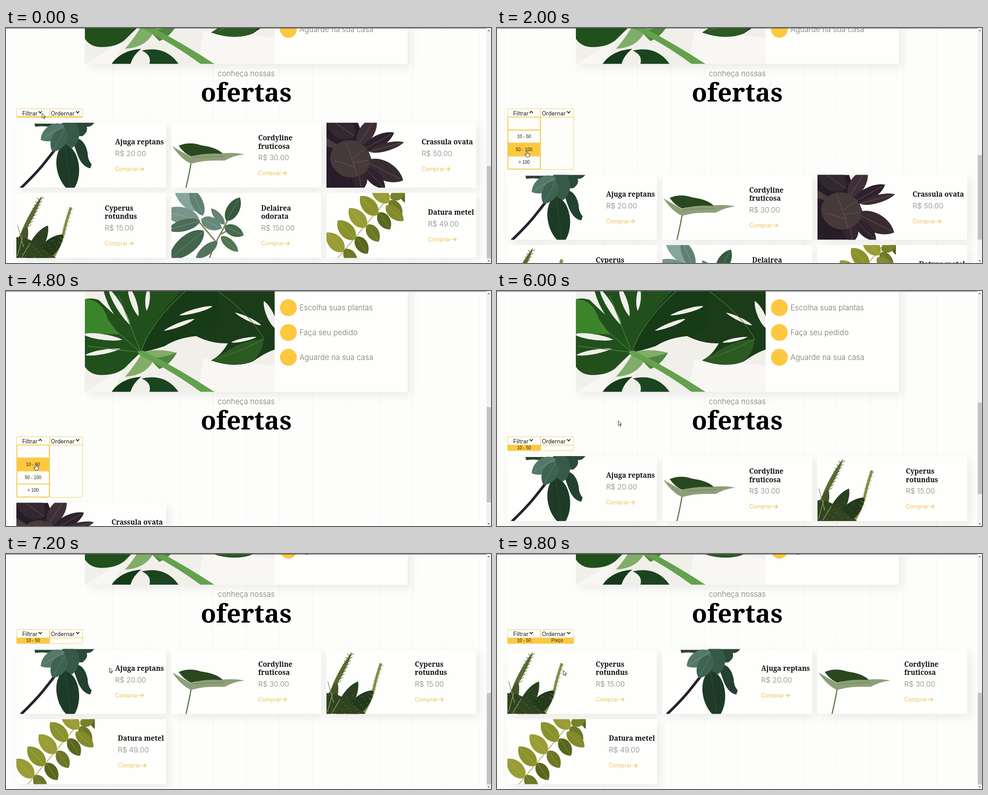
Recreate the animation shown at these times as an HTML page with a canvas. Size 1076x521 px, loop 10000 ms.

```html
<!DOCTYPE html>
<html lang="pt">
<head>
<meta charset="utf-8">
<style>
html, body { margin: 0; width: 100%; height: 100%; overflow: hidden; background: #fdfdfb; }
canvas { display: block; }
</style>
</head>
<body>
<canvas id="stage" width="1076" height="521"></canvas>
<script>
const ctx = document.getElementById('stage').getContext('2d');
const YELLOW = '#fdc840', LINE = '#f2cf5c', PAPER = '#f1efea';
const SANS = 'Inter, sans-serif', SERIF = '"Noto Serif", serif', ARIAL = '"Liberation Sans", sans-serif';

function box(x, y, w, h, color) {
  ctx.fillStyle = color;
  ctx.fillRect(x, y, w, h);
}
function frame(x, y, w, h, width = 1) {
  ctx.strokeStyle = LINE;
  ctx.lineWidth = width;
  ctx.beginPath();
  ctx.roundRect(x, y, w, h, 2);
  ctx.stroke();
}
function text(str, x, y, font, color, align = 'left') {
  ctx.font = font;
  ctx.fillStyle = color;
  ctx.textAlign = align;
  ctx.fillText(str, x, y);
}
function shape(d, fill) {
  ctx.fillStyle = fill;
  ctx.fill(new Path2D(d));
}
function line(d, color, width) {
  ctx.strokeStyle = color;
  ctx.lineWidth = width;
  ctx.stroke(new Path2D(d));
}
function shadowBox(x, y, w, h) {
  ctx.save();
  ctx.shadowColor = 'rgba(0,0,0,.07)';
  ctx.shadowBlur = 20;
  ctx.shadowOffsetX = ctx.shadowOffsetY = 8;
  box(x, y, w, h, '#fefefd');
  ctx.restore();
}
// Pointed leaf from (x1,y1) to (x2,y2), with an optional midrib.
function leaf(x1, y1, x2, y2, width, color, rib) {
  const len = Math.hypot(x2 - x1, y2 - y1);
  ctx.save();
  ctx.translate(x1, y1);
  ctx.rotate(Math.atan2(y2 - y1, x2 - x1));
  const w = width * 0.66;
  shape(`M0 0C${len * .15} ${-w} ${len * .75} ${-w} ${len} 0C${len * .75} ${w} ${len * .15} ${w} 0 0`, color);
  if (rib) line(`M0 0H${len * .92}`, rib, 0.8);
  ctx.restore();
}

function drawAjuga() {
  line('M10 145Q44 112 60 92T90 54', '#25222c', 6);
  leaf(107, 46, 122, 154, 50, '#1e3b27', '#34533b');
  shape('M122 34Q150 30 158 66Q158 82 167 92L164 101Q146 98 136 72Z', '#24402f');
  shape('M40 2H100V18Q72 4 42 9Z', '#29442f');
  shape('M104 0H173Q166 10 156 9Q160 20 146 30Q126 30 104 14Z', '#2c4a38');
  leaf(112, -8, 124, 56, 44, '#365a47');
  leaf(106, 6, 54, 38, 34, '#55786b', '#7d9a8c');
  leaf(108, 14, 80, 64, 34, '#3e6350', '#66887a');
}
function drawCordyline() {
  line('M44 86Q40 112 32 145', '#55703f', 2.4);
  shape('M2 52Q22 64 44 76Q90 60 112 68Q140 65 162 70Q140 72 118 84Q70 82 44 91Q22 82 2 52', '#8d9f78');
  shape('M16 51Q40 41 66 50Q102 55 114 69Q74 66 44 75Q28 68 16 51', '#294820');
  line('M44 77Q80 76 118 74', '#5d7747', 0.8);
}
function drawCrassula() {
  const rib = '#77655f';
  shape('M0 0H70L92 60L104 92L84 120V144H0Z', '#261d28');
  shape('M0 34L26 50L14 56L0 52Z', '#4a3c40');
  leaf(62, 30, 0, -14, 50, '#33282f', rib);
  leaf(70, 50, 110, -12, 34, '#3e3036', rib);
  leaf(78, 62, 150, 22, 28, '#2d222c', rib);
  leaf(95, 64, 172, 43, 18, '#3a2c31', rib);
  leaf(88, 86, 170, 128, 42, '#382b31', rib);
  leaf(84, 100, 130, 146, 28, '#2d222d', rib);
  leaf(70, 100, 78, 150, 34, '#33262f', rib);
  ctx.beginPath();
  ctx.ellipse(53, 80, 45, 41, 0.3, 0, 7);
  ctx.fillStyle = '#463a3a';
  ctx.fill();
  line('M68 120Q58 76 42 44M62 98L18 84M58 78L84 60M60 88L92 84', rib, 0.8);
}
function drawCyperus() {
  leaf(8, 98, 57, 6, 10, '#596c32');
  line('M80 146Q100 112 105 88T121 32', '#838b47', 6);
  leaf(0, 150, 24, 72, 22, '#46552a');
  leaf(24, 152, 70, 72, 30, '#2b4020');
  leaf(44, 152, 104, 92, 34, '#24381b');
  shape('M0 98Q26 96 50 118L88 144H0Z', '#2f441f');
  for (let i = 0; i < 34; i++) {
    const x = i * 37 % 88 + 3, y = 102 + i * 23 % 42;
    box(x, y, 1.2, 1.2, '#93a05d');
  }
  for (let i = 0; i < 9; i++) {
    const x = 24 + i * 3.5, y = 76 - i * 7.5;
    line(`M${x - 6} ${y - 5}L${x} ${y}L${x + 9} ${y - 6}`, '#59682f', 1.3);
    line(`M${98 + i * 2.7} ${112 - i * 9}l-5 -5m5 5l7 -5`, '#9aa264', 1);
  }
  line('M2 140L14 98M12 142L30 112M3 72L16 120', '#8e9565', 1.5);
}
function drawDelairea() {
  line('M84 146Q94 116 108 92T132 44M100 110L58 60M108 92L140 76', '#807d5c', 3);
  leaf(58, 40, 6, -20, 34, '#86a59b');
  leaf(70, 50, 42, -12, 26, '#5f8174', '#91a89b');
  leaf(62, 60, -18, 40, 38, '#779589', '#9fb6aa');
  leaf(64, 62, -10, 82, 26, '#4c6e59', '#8ca291');
  leaf(66, 58, 112, 78, 28, '#66897a', '#9cb2a2');
  leaf(72, 84, -6, 148, 40, '#42654c', '#819a80');
  leaf(102, 108, 54, 146, 22, '#54745d');
  leaf(122, 62, 152, 10, 28, '#365a3d', '#738d6b');
  leaf(118, 74, 160, 94, 25, '#456b4f', '#8ca083');
  leaf(110, 96, 148, 130, 20, '#527654', '#8ca083');
  leaf(118, 70, 88, 34, 16, '#658371');
}
function drawDatura() {
  line('M24 146Q74 86 148 -2', '#b5b377', 2);
  for (let i = 0; i < 6; i++) {
    const x = 38 + i * 25, y = 130 - i * 27;
    leaf(x, y, x - 38, y - 42, 32, i % 2 ? '#8b922c' : '#9a9c35', '#b6b562');
    leaf(x + 3, y - 6, x + 28, y + 32, 27, i % 2 ? '#59661f' : '#6d7826', '#95994a');
  }
  leaf(132, 28, 171, 62, 26, '#838a2c', '#adad5b');
  leaf(142, 12, 174, -4, 24, '#77812b');
}

const plants = [
  { title: ['Ajuga reptans'], price: 20, left: 219, draw: drawAjuga },
  { title: ['Cordyline', 'fruticosa'], price: 30, left: 192.5, draw: drawCordyline },
  { title: ['Crassula ovata'], price: 50, left: 211, draw: drawCrassula },
  { title: ['Cyperus', 'rotundus'], price: 15, left: 196, draw: drawCyperus },
  { title: ['Delairea', 'odorata'], price: 150, left: 199, draw: drawDelairea },
  { title: ['Datura metel'], price: 49, left: 225, draw: drawDatura },
];

function drawCard(plant, x, y) {
  shadowBox(x, y, 332, 144);
  ctx.save();
  ctx.translate(x, y);
  ctx.save();
  ctx.beginPath();
  ctx.rect(0, 0, 174, 144);
  ctx.clip();
  plant.draw();
  ctx.restore();
  const { title, left } = plant, two = title.length > 1;
  title.forEach((row, i) => text(row, left, (two ? 39 : 48) + i * 18.5, `900 15.3px ${SERIF}`, '#111'));
  const base = two ? 83 : 74;
  text(`R$ ${plant.price}.00`, left, base, `300 16.2px ${SANS}`, '#85857f');
  text('Comprar', left, base + 33, `400 12.4px ${SANS}`, '#efc453');
  line(`M${left + 53} ${base + 29}h10m-4.5 -4.5l4.5 4.5l-4.5 4.5`, '#efc453', 1.4);
  ctx.restore();
}

// Local y = 0 lies 223.5 px above the lower edge of the hero.
function drawHero(bottom) {
  shadowBox(175, bottom - 330, 716, 330);
  ctx.save();
  ctx.translate(0, bottom - 223.5);
  ctx.beginPath();
  ctx.rect(175, -110, 421, 333.5);
  ctx.clip();
  box(175, -110, 421, 334, PAPER);
  shape('M175 224L265 168L235 224ZM438 150L596 165V224H425Z', '#f8f7f4');
  // right-hand leaves
  shape('M380 -10H596V130Q576 136 548 156Q510 172 455 154Q478 142 492 116Q440 118 390 80Z', '#1a3c18');
  shape('M572 106Q540 108 510 122Q484 136 455 154Q505 172 545 156Q568 142 572 106Z', '#2c5922');
  leaf(600, 84, 572, 22, 16, PAPER);
  leaf(566, 76, 508, 48, 8, PAPER);
  leaf(500, 114, 556, 102, 7, PAPER);
  line('M572 106Q540 50 470 0M572 106Q530 130 470 150', '#4c7a3c', 1.2);
  // large leaf
  shape('M175 -10H470V66Q458 98 420 100Q380 104 352 122Q322 132 299 136Q282 152 262 172Q240 188 206 186Q186 184 175 168Z', '#21501c');
  shape('M175 18Q212 18 226 62L250 96L175 94Z', '#3c842a');
  shape('M299 136Q318 70 400 -10H470V66Q458 98 420 100Q380 104 352 122Q322 132 299 136Z', '#173a17');
  shape('M175 -10H214Q222 26 240 52Q226 40 206 20Q190 14 175 18Z', PAPER);
  leaf(228, -4, 276, 76, 13, PAPER);
  leaf(272, -8, 294, 56, 13, PAPER);
  leaf(316, -6, 312, 44, 10, PAPER);
  leaf(172, 96, 258, 108, 13, PAPER);
  leaf(176, 142, 254, 128, 10, PAPER);
  leaf(418, 62, 350, 88, 9, PAPER);
  leaf(458, 34, 384, 54, 9, PAPER);
  line('M299 136Q320 70 398 0M299 136L190 42M299 136L180 122M299 136L250 10', '#4f8540', 1.3);
  shape('M299 142Q282 170 264 190Q308 188 326 156Q358 158 379 137Q340 126 299 136Z', '#80ad68');
  shape('M318 150Q348 148 379 137Q364 164 340 173Z', '#4f8740');
  shape('M293 134L304 132Q390 176 463 224H432Q370 178 294 141Z', '#64a14f');
  // lower leaves
  shape('M234 224Q254 194 300 190Q282 204 276 224Z', '#163b1b');
  shape('M301 194Q354 182 383 224H318Q324 204 301 194Z', '#1b4520');
  ctx.restore();
  ['Escolha suas plantas', 'Faça seu pedido', 'Aguarde na sua casa'].forEach((step, i) => {
    const y = bottom - 186.5 + i * 55;
    ctx.fillStyle = YELLOW;
    ctx.beginPath();
    ctx.arc(626.5, y, 18.7, 0, 7);
    ctx.fill();
    text(step, 651, y + 6, `300 16.8px ${SANS}`, '#777771');
  });
}

const menus = [
  { label: 'Filtrar', x: 23.5, textX: 36, chevron: 76, options: ['', '10 - 50', '50 - 100', '> 100'] },
  { label: 'Ordernar', x: 97, textX: 99.5, chevron: 159, options: ['', 'Nome', 'Preço'] },
];

function drawMenu(menu, top, bottom, open, chosen, anyChosen, cursor) {
  const { x, options } = menu, list = top + 18.5;
  frame(x, top, 73, bottom - top);
  text(menu.label, menu.textX, top + 14.5, `400 12.4px ${SANS}`, '#1c1c1c');
  const flip = open ? -1 : 1;
  line(`M${menu.chevron - 3.5} ${top + 7.5 - flip * 2}l3.5 ${flip * 4}l3.5 ${-flip * 4}`, '#111', 1.7);
  if (open) {
    options.forEach((option, i) => {
      const y = list + i * 28.8;
      const hover = cursor.x > x && cursor.x < x + 73 && cursor.y >= y && cursor.y < y + 28.8;
      if (hover) box(x, y, 73, 28.8, YELLOW);
      frame(x + 0.5, y, 72, 28.8, 2);
      text(option, x + 36.5, y + 17.5, `10px ${ARIAL}`, '#222', 'center');
    });
  } else if (chosen) {
    box(x, list - 0.5, 73, 13, YELLOW);
    text(options[chosen], x + 36.5, list + 9, `10px ${ARIAL}`, '#222', 'center');
  } else {
    box(x, list - 0.5, 73, 1.2, LINE);
    if (!anyChosen && bottom - list < 20) box(x, bottom - 2.5, 73, 3, LINE);
  }
}

const cursorPath = [
  [0, 80, 189], [600, 77, 190], [1000, 68, 212], [1400, 66, 240], [1900, 66, 273], [2400, 66, 273],
  [3000, 189, 320], [3400, 189, 320], [3900, 76, 332], [4100, 76, 332], [4700, 66, 384], [5200, 66, 384],
  [5800, 269, 288], [6900, 269, 287], [7700, 144, 178], [8200, 144, 178], [8900, 135, 255],
  [9400, 135, 257], [9700, 147, 258], [10000, 147, 258],
];
function cursorAt(t) {
  const i = cursorPath.findIndex(key => key[0] > t);
  const [t0, x0, y0] = cursorPath[i - 1], [t1, x1, y1] = cursorPath[i];
  const u = (t - t0) / (t1 - t0), k = u * u * (3 - 2 * u);
  return { x: x0 + (x1 - x0) * k, y: y0 + (y1 - y0) * k };
}
function drawCursor({ x, y }, kind) {
  const outlines = {
    arrow: 'M0 0V10.5L2.6 8.2L4.3 12L6 11.2L4.4 7.6H7.6Z',
    hand: 'M-1 0Q0.5 -1 1.5 0V5L6 6V10L4.5 13H-1.5L-4.5 8L-3.5 7L-1 8.5Z',
  };
  ctx.save();
  ctx.translate(x, y);
  if (kind === 'text') {
    line('M-2.5 -5H2.5M0 -5V5M-2.5 5H2.5', '#222', 1.2);
  } else {
    shape(outlines[kind], '#fff');
    line(outlines[kind], '#222', 1);
  }
  ctx.restore();
}

function pageTop(t) {
  if (t < 2400) return 79.5;
  if (t < 6200) return 223.5;
  return t < 6400 ? 128 : t < 6600 ? 71.5 : 68;
}
const within = (t, from, to) => t >= from && t < to;

function draw(now) {
  const t = Math.floor(now % 10000 / 200) * 200;
  const base = pageTop(t), cursor = cursorAt(t);
  const open = within(t, 400, 2400) || within(t, 4000, 5200) ? 0 : within(t, 7800, 9400) ? 1 : -1;
  const chosen = [t < 2400 ? 0 : t < 5200 ? 2 : 1, t < 9400 ? 0 : 2];
  const anyChosen = chosen[0] > 0;

  box(0, 0, 1076, 521, '#fdfdfb');
  ctx.setLineDash([1, 1]);
  for (let i = 0; i < 15; i++) line(`M${Math.round(16 + i * 73.8) + .5} 0V521`, i % 14 < 3 ? '#f4f4df' : '#e9e9ef', 1);
  ctx.setLineDash([]);

  drawHero(base);
  text('conheça nossas', 533, base + 27, `300 16.6px ${SANS}`, '#777771', 'center');
  text('ofertas', 533, base + 83.5, `900 56px ${SERIF}`, '#000', 'center');

  const gridTop = base + (open === 0 ? 246 : open === 1 ? 217.5 : anyChosen ? 142.5 : 130.5);
  menus.forEach((menu, i) =>
    drawMenu(menu, base + 99.5, gridTop - 12, open === i, chosen[i], anyChosen, cursor));

  const [low, high] = [[0, 1e3], [10, 50], [50, 100]][chosen[0]];
  const shown = plants.filter(p => p.price >= low && p.price < high);
  if (chosen[1]) shown.sort((a, b) => a.price - b.price);
  shown.forEach((p, i) => drawCard(p, 23 + i % 3 * 344, gridTop + Math.floor(i / 3) * 155.7));

  const scroll = 830 - base;
  const pageHeight = scroll + gridTop + Math.ceil(shown.length / 3) * 155.5;
  box(1066, 0, 10, 521, '#f1f1f1');
  box(1066.5, 11 + scroll / pageHeight * 500, 9.5, 521 / pageHeight * 500, '#c4c4c4');
  shape('M1068.5 7L1071 4L1073.5 7ZM1068.5 515L1071 518L1073.5 515Z', '#666');
  box(0, 0, 1066, 1, '#4a4a50');

  const overList = open >= 0 && cursor.y > base + 118 && cursor.y < gridTop - 12
    && cursor.x > menus[open].x && cursor.x < menus[open].x + 73;
  const overLabel = within(cursor.y, base + 101, base + 117)
    && (within(cursor.x, 36, 70) || within(cursor.x, 100, 152));
  drawCursor(cursor, overList ? 'hand' : overLabel ? 'text' : 'arrow');
}

const start = performance.now();
function tick() {
  draw(performance.now() - start);
  requestAnimationFrame(tick);
}
tick();
</script>
</body>
</html>
```
